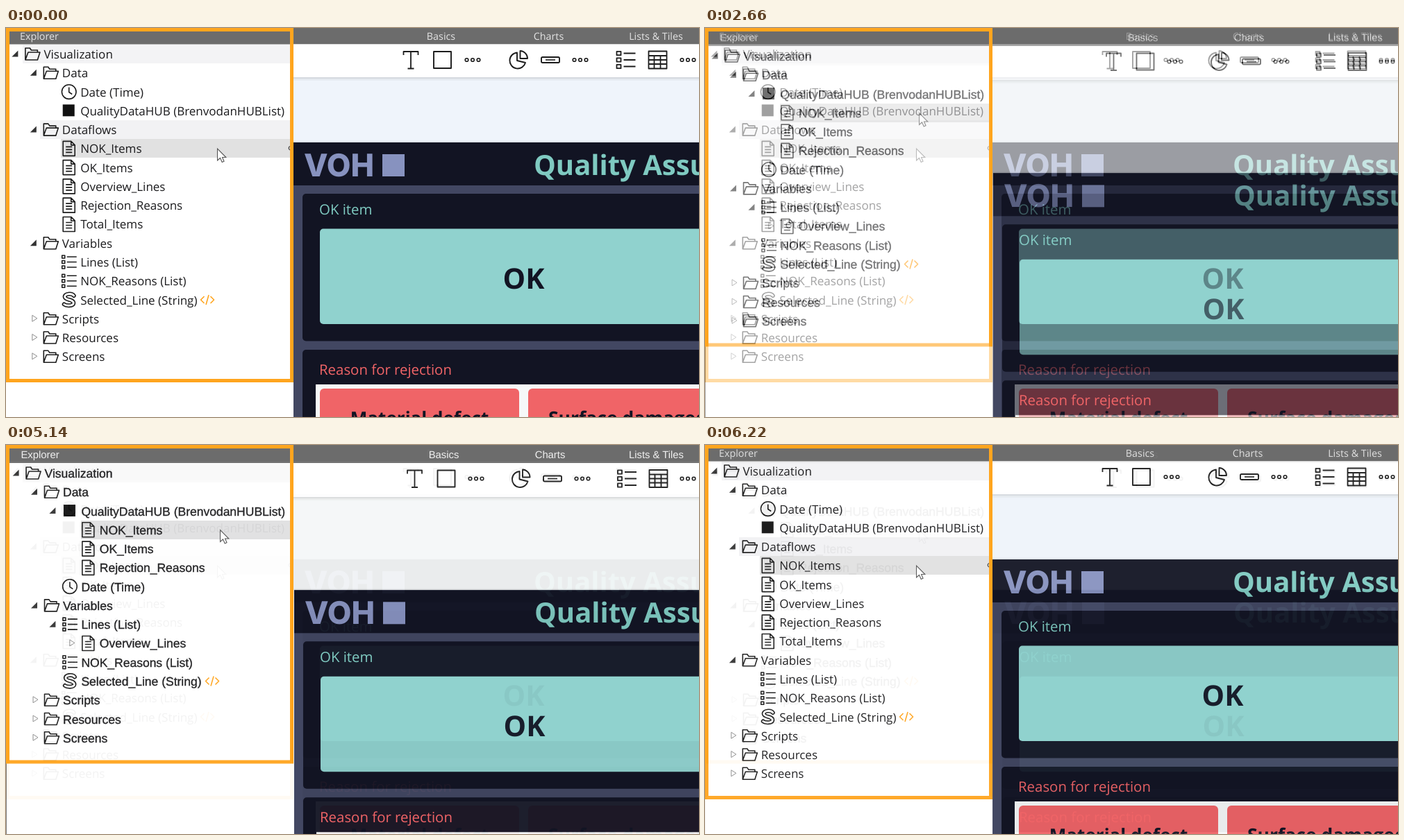
These frames come from a looping animation (998 px wide and 561 px high, 6280 ms). An HTML page:

```html
<!DOCTYPE html>
<html lang="en">
<head>
<meta charset="utf-8">
<title>Explorer comparison</title>
<style>
html, body { margin: 0; width: 100%; height: 100%; overflow: hidden; background: #fff; }
svg { display: block; width: 100vw; height: 100vh; }
text { white-space: pre; text-rendering: geometricPrecision; }
.sans { font-family: "Open Sans", "Noto Sans", sans-serif; }
.grot { font-family: "Liberation Sans", Arial, sans-serif; }
.dense text { stroke: #1b1b1d; stroke-width: .35; }
.ico { fill: none; stroke: #1c1c1c; stroke-width: 1.6; stroke-linejoin: round; }
</style>
</head>
<body>
<svg id="stage" viewBox="0 0 998 561" preserveAspectRatio="none"></svg>
<script>
const ORANGE = '#ffa51e', INK = '#1b1b1d', NAVY = '#121423', TEAL = '#7fcac1', RED = '#f06467';

const rect = (x, y, w, h, fill, rx = 0) =>
  `<rect x="${x}" y="${y}" width="${w}" height="${h}" fill="${fill}" rx="${rx}"/>`;
const text = (x, y, size, fill, str, extra = '') =>
  `<text x="${x}" y="${y}" font-size="${size}" fill="${fill}" ${extra}>${str.replace(/&/g, '&amp;')}</text>`;
const at = (x, y, body) => `<g transform="translate(${x} ${y})">${body}</g>`;
const path = (d, extra = '') => `<path d="${d}" ${extra}/>`;
const mid = 'text-anchor="middle"';
const bold = 'font-weight="700"';

// Icons are drawn around their own centre.
const sCurve = 'M7-6C4-10-7-9-6-4C-5 1 7-1 6.500 5C6 9-4 9-7 6.500';
const icons = {
  folder: path('M-10 8.500V-8.500H-3.500L-1.500-5.500H7.500V-2.500M-10 8.500L-6-2.500H11L7.500 8.500Z'),
  doc: path('M-8.500-10.500H3L8.500-5V10.500H-8.500ZM3-10.500V-5H8.500M-4.500-2.500H4.500M-4.500 1.500H4.500M-4.500 5.500H4.500'),
  clock: '<circle r="10.300"/>' + path('M0-6.500V.5L4.500 3.500'),
  list: [-7.5, 0, 7.5].map(y => path(`M-10 ${y - 2}h4v4h-4zM-3 ${y}H11`)).join(''),
  string: path(sCurve, 'stroke-width="6" stroke-linecap="round"') +
    path(sCurve, 'stroke="#fff" stroke-width="2.800" stroke-linecap="round"'),
  hub: path('M-9-9H8V8H-9Z', 'fill="#111" stroke="none"'),
  open: path('M4.500-4.500V4.500H-4.500Z', 'fill="#333" stroke="none"'),
  shut: path('M-3.500-4.500L3.500 0L-3.500 4.500Z', 'stroke="#8c8c8c" stroke-width="1"'),
  code: path('M-4.500-5L-9.500 0L-4.500 5M4.500-5L9.500 0L4.500 5M2-7L-2 7', `stroke="${ORANGE}"`),
  letter: path('M-10.500-7V-12H10.500V-7M0-12V12M-4.500 12.500H4.500', 'stroke-width="1.800"'),
  box: path('M-12.500-12H12.500V12H-12.500Z', 'stroke-width="1.900"'),
  dots: [-8.5, 0, 8.5].map(x => `<circle cx="${x}" r="2.300"/>`).join(''),
  pie: path('M-2-10.500A11.500 11.500 0 1 0 10 4L-2 1ZM2.500-13A11 11 0 0 1 13-2L2.500-2Z', 'stroke-width="1.900"'),
  button: '<rect x="-13" y="-4" width="26" height="8" rx="1.800" stroke-width="1.900"/>' + path('M-7 0H7'),
  rows: [-9.5, 0, 9.5].map(y => path(`M-13 ${y - 2.7}h6v5.400h-6zM-3 ${y}H14`, 'stroke-width="1.800"')).join(''),
  table: path('M-13-12.500H13V12.500H-13ZM-13-6H13M-13 0H13M-13 6H13M-5-6V12.500M4-6V12.500', 'stroke-width="1.800"')
};
const icon = (name, x, y) => at(x, y, `<g class="ico">${icons[name]}</g>`);

const cursor = (x, y) => at(x, y,
  path('M0 0V17L4 13.500L6.700 19.500L9.500 18.300L7 12.500H12.300Z', 'fill="#fff" stroke="#555" stroke-width="1.100"'));

// Rows: depth, icon, label, arrow
const closedFolders = ['Scripts', 'Resources', 'Screens'].map(s => [1, 'folder', s, 'shut']);
const flatTree = [
  [0, 'folder', 'Visualization', 'open'],
  [1, 'folder', 'Data', 'open'],
  [2, 'clock', 'Date (Time)'],
  [2, 'hub', 'QualityDataHUB (BrenvodanHUBList)'],
  [1, 'folder', 'Dataflows', 'open'],
  [2, 'doc', 'NOK_Items'],
  [2, 'doc', 'OK_Items'],
  [2, 'doc', 'Overview_Lines'],
  [2, 'doc', 'Rejection_Reasons'],
  [2, 'doc', 'Total_Items'],
  [1, 'folder', 'Variables', 'open'],
  [2, 'list', 'Lines (List)'],
  [2, 'list', 'NOK_Reasons (List)'],
  [2, 'string', 'Selected_Line (String)'],
  ...closedFolders
];
const nestedTree = [
  [0, 'folder', 'Visualization', 'open'],
  [1, 'folder', 'Data', 'open'],
  [2, 'hub', 'QualityDataHUB (BrenvodanHUBList)', 'open'],
  [3, 'doc', 'NOK_Items'],
  [3, 'doc', 'OK_Items'],
  [3, 'doc', 'Rejection_Reasons'],
  [2, 'clock', 'Date (Time)'],
  [1, 'folder', 'Variables', 'open'],
  [2, 'list', 'Lines (List)', 'open'],
  [3, 'doc', 'Overview_Lines', 'shut'],
  [2, 'list', 'NOK_Reasons (List)'],
  [2, 'string', 'Selected_Line (String)'],
  ...closedFolders
];

const tree = (rows, x0, y0, size, codeX) => rows.map(([depth, kind, label, arrow], i) => {
  const x = x0 + depth * 26.4, y = y0 + i * 27.27;
  return (arrow ? icon(arrow, x - 41.5 + (arrow === 'shut' ? 2 : 0), y - 1) : '') +
    icon(kind, x - 16.5, y - .5) +
    text(x, y + 6, size, INK, label) +
    (kind === 'string' ? icon('code', codeX, y - .5) : '');
}).join('');

const frame = bottom =>
  `<rect x="2.500" y="2.500" width="409" height="${bottom - 5}" fill="none" stroke="${ORANGE}" stroke-width="5"/>`;

const dashboard = (dx, dy) => at(dx, dy,
  rect(414, 163, 600, 2, '#0001') +
  rect(414, 165, 600, 420, '#424762') +
  rect(414, 165, 600, 62, NAVY) +
  text(429, 214, 45, '#8792bf', 'VOH', 'font-weight="800" font-family="Inter, sans-serif"') +
  rect(542, 182, 32, 32, '#8792bf') +
  text(760, 212, 40, TEAL, 'Quality Assurance', bold) +
  rect(427, 239, 600, 212.5, NAVY, 5) +
  text(451, 269, 20.4, TEAL, 'OK item') +
  rect(452, 289.5, 600, 137.5, '#90d2ce', 5) +
  text(745.5, 376, 41, NAVY, 'OK', `${bold} ${mid}`) +
  rect(427, 464, 600, 130, NAVY, 5) +
  text(451, 500, 20.4, RED, 'Reason for rejection') +
  rect(446, 514, 600, 80, '#f6f8f8') +
  rect(452, 520, 287, 80, RED, 6) +
  rect(752, 520, 287, 80, RED, 6) +
  text(595.5, 571.5, 26.1, NAVY, 'Material defect', `${bold} ${mid}`) +
  text(781, 571.5, 26.5, NAVY, 'Surface damaged', bold));

const ribbon = o =>
  rect(0, 0, 998, o.head, '#6c6c6c') +
  text(o.titleX, o.base, o.size, o.label, 'Explorer') +
  ['Basics', 'Charts', 'Lists & Tiles'].map((s, i) => text(o.tabs[i], o.base, o.size, o.label, s, mid)).join('') +
  rect(414, o.head, 584, o.bar - o.head, '#fff') +
  rect(414, o.bar, 584, 140, o.canvas) +
  rect(414, o.bar, 584, 2, '#0001') + rect(414, o.bar, 584, 4.5, '#0000000c') +
  ['letter', 'box', 'dots', 'pie', 'button', 'dots', 'rows', 'table', 'dots']
    .map((name, i) => icon(name, o.tools[i], o.toolY)).join('');

const before =
  rect(0, 0, 998, 561, '#fff') +
  ribbon({ head: 23.5, bar: 71, canvas: '#eff4fb', label: '#e4e4e4', titleX: 20, base: 16.5, size: 14.3,
    tabs: [626.5, 781.5, 936], toolY: 46, tools: [583, 628.5, 672, 738, 784, 827, 892.5, 938.5, 982] }) +
  dashboard(0, 0) +
  rect(24, 24, 385, 27, '#f3f3f5') +
  rect(49, 133, 360, 27, '#f2f2f4') +
  rect(79, 160, 330, 27, '#e1e1e1') +
  tree(flatTree, 54.4, 38, 17, 290) +
  path('M409 170.500A3 3 0 0 0 409 176', 'fill="none" stroke="#444" stroke-width="1.300"') +
  cursor(304.5, 174) +
  frame(511);

const after =
  rect(0, 0, 998, 561, '#fff') +
  rect(0, 459, 1, 102, '#777') +
  ribbon({ head: 26, bar: 75, canvas: '#f6f8f8', label: '#f6f6f6', titleX: 21.5, base: 18.5, size: 14.8,
    tabs: [630.5, 783.5, 936.5], toolY: 48.5, tools: [588.5, 634, 677, 741.5, 787, 830, 894, 939.5, 982] }) +
  `<g class="sans">${dashboard(1, 44.3)}</g>` +
  rect(24, 27, 385, 27, '#fafafa') +
  rect(108, 109, 301, 27, '#e0e0e1') +
  `<g class="dense">${tree(nestedTree, 55.6, 41, 17.5, 297)}</g>` +
  cursor(308.5, 122.5) +
  frame(459.5);

document.getElementById('stage').innerHTML =
  `<g class="sans">${before}</g><g class="grot" id="after">${after}</g>`;

const LOOP = 6280, HOLD = 2000, STEP = 60, STEPS = 20;
const RAMP = STEP * (STEPS - 1);
const layer = document.getElementById('after');

// Stepped cross-fade: hold, fade in, hold, fade out.
const fade = t => Math.min(1, Math.max(0, (Math.floor((t - HOLD) / STEP) + 1) / STEPS));
const mix = t => fade(t) - fade(t - HOLD - RAMP);

const start = performance.now();
function draw() {
  layer.setAttribute('opacity', mix((performance.now() - start) % LOOP));
  requestAnimationFrame(draw);
}
draw();
</script>
</body>
</html>
```
